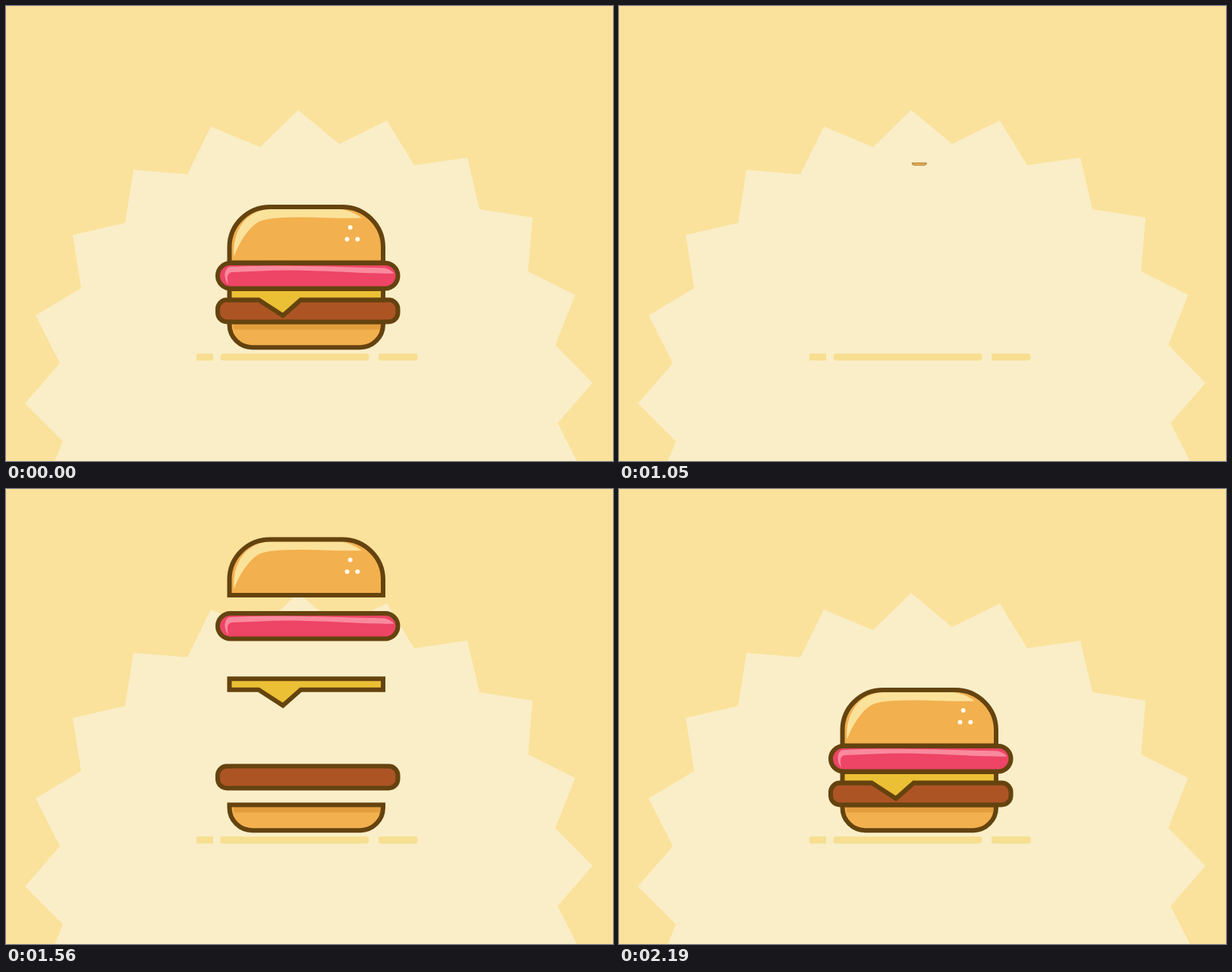
Animation of 800 by 600 pixels, one loop 2220 ms. Source, as an HTML page with a canvas:

```html
<!DOCTYPE html>
<html lang="en">
<head>
<meta charset="utf-8">
<title>Burger loop</title>
<style>
  html, body { margin: 0; width: 100%; height: 100%; overflow: hidden; background: #fae29c; }
  canvas { display: block; }
</style>
</head>
<body>
<canvas id="stage" width="800" height="600"></canvas>
<script>
const ctx = document.getElementById('stage').getContext('2d');
const LOOP = 2220, STEP = 30, STAGGER = 60;
const INK = '#64430f', BUN = '#f3b04e', DASH = '#efd277', CENTER = [400, 348];

const star = new Path2D('M385 137L439 182 502 151 538 210 608 200 624 268 694 279 688 350 750 381 ' +
  '724 447 773 497 727 550 753 601H64L75 574 25 524 71 471 39 408 99 372 88 302 157 286 168 216 ' +
  '239 222 270 159 335 186Z');

// Parts from bottom to top, drawn in their resting place; cy is the pivot.
const parts = [
  { cy: 433.5, fill: BUN,
    shape: new Path2D('M294.5 416.5H497V420C497 437 483 450.2 467 450.2H324.5C308 450.2 294.5 437 294.5 420Z'),
    detail() { box(300, 418, 194.5, 8.5, 0, '#e29e3c'); } },
  { cy: 402, fill: '#ad5424', shape: pill(279, 387.5, 237.5, 29, 12) },
  { cy: 391, fill: '#ecc035',
    shape: new Path2D('M294.5 373H497V387.5H388.5L365 408.3 333 387.5H294.5Z') },
  { cy: 355.75, fill: '#ee4466', shape: pill(279, 339, 237.5, 33.5, 16.7),
    detail() {
      paint('#f98a9e', new Path2D('M293 367C287 361 286 345 296 344C350 341 440 344 499 345.5' +
        'Q506 347 511.5 352.5C470 354 400 346 335 349.5L298 351C291 352 291 358 293 367Z'));
    } },
  { cy: 301.75, fill: BUN,
    shape: new Path2D('M294.5 338.5V318C294.5 288 319 265 348 265H443C473 265 497 289 497 318V338.5Z'),
    detail() {
      paint('#fbe29b', new Path2D('M300.5 330C298 297 316 268 350 268H441Q456 270 469 279.5' +
        'C438 281 400 277 365 279C345 280 335 282 328 288C315 299 307 314 300.5 330Z'));
      for (const [x, y] of [[453.7, 292], [449.5, 307.6], [463.3, 307.6]]) {
        const dot = new Path2D();
        dot.arc(x, y, 3, 0, 7);
        paint('#fffaeb', dot);
      }
    } }
];

// Fall of the lowest part: time, offset from rest.
const fall = [[1000, -225], [1050, -225], [1170, -222], [1230, -218], [1290, -208], [1320, -198.5],
  [1350, -189], [1380, -175], [1410, -154], [1440, -122.7], [1470, -77], [1500, -22], [1520, 0]];

function pill(x, y, w, h, r) {
  const p = new Path2D();
  p.roundRect(x, y, w, h, r);
  return p;
}

function paint(color, path) {
  ctx.fillStyle = color;
  ctx.fill(path);
}

function box(x, y, w, h, r, color) {
  paint(color, pill(x, y, w, h, r));
}

function ramp(t, from, to) {
  return Math.min(1, Math.max(0, (t - from) / (to - from)));
}

function smooth(u) {
  return u * u * (3 - 2 * u);
}

function drop(t) {
  if (t <= fall[0][0]) return fall[0][1];
  for (let i = 1; i < fall.length; i++) {
    const [t1, y1] = fall[i], [t0, y0] = fall[i - 1];
    if (t <= t1) return y0 + (y1 - y0) * ramp(t, t0, t1);
  }
  return 0;
}

function scaled(x, y, s, dy, draw) {
  if (s <= 0) return;
  ctx.save();
  ctx.translate(x, y + dy);
  ctx.scale(s, s);
  ctx.translate(-x, -y);
  draw();
  ctx.restore();
}

function drawPart(part) {
  paint(part.fill, part.shape);
  if (part.detail) part.detail();
  ctx.strokeStyle = INK;
  ctx.lineWidth = 6;
  ctx.stroke(part.shape);
}

function line(x1, y1, x2, y2, w) {
  ctx.beginPath();
  ctx.moveTo(x1, y1);
  ctx.lineTo(x2, y2);
  ctx.lineWidth = w;
  ctx.lineCap = 'round';
  ctx.strokeStyle = DASH;
  ctx.stroke();
  ctx.lineCap = 'butt';
}

function backdrop() {
  ctx.fillStyle = '#fae29c';
  ctx.fillRect(0, 0, 800, 600);
  paint('#faeec8', star);
  box(251, 458.3, 22, 9.2, 0.5, '#f7de91');
  box(282.5, 458.3, 196, 9.2, 4, '#f7de91');
  box(491, 458.3, 51.3, 9.2, 2, '#f7de91');
}

function spinner(t) {
  const size = smooth(ramp(t, 420, 500)) * (1 - smooth(ramp(t, 850, 1010)));
  if (size <= 0) return;
  ctx.save();
  ctx.translate(...CENTER);
  ctx.rotate(Math.PI * (t - 510) / 280);
  ctx.scale(size, size);
  line(12.6, -68, 13.3, -14.5, 11.5);
  ctx.restore();
}

function impact(t) {
  const out = 1 - Math.pow(1 - ramp(t, 1740, 1920), 2);
  const tail = smooth(ramp(t, 1830, 2190));
  if (t <= 1740 || t >= 2190) return;
  for (const side of [-1, 1]) {
    for (const k of [-1, 0, 1]) {
      const a = k * 0.35, reach = k ? 179 : 196;
      const tip = 140 + (reach - 140) * out;
      const root = 130 + (tip - 130) * tail;
      const dx = side * Math.cos(a), dy = Math.sin(a);
      line(CENTER[0] + dx * root, CENTER[1] + dy * root,
        CENTER[0] + dx * tip, CENTER[1] + dy * tip, 11.5 * (1 - 0.5 * tail));
    }
  }
}

function render(t) {
  backdrop();
  if (t < 990) {
    spinner(t);
    const u = ramp(t, 210, 450);
    scaled(397.5, 357.5, 1 - smooth(u), 0, () => parts.forEach(drawPart));
    return;
  }
  impact(t);
  parts.forEach((part, i) => {
    const local = t - i * STAGGER;
    scaled(395.75, part.cy, smooth(ramp(local, 995, 1285)), drop(local), () => drawPart(part));
  });
}

const start = performance.now();
function tick() {
  const t = (performance.now() - start) % LOOP;
  render(Math.floor(t / STEP) * STEP);
  requestAnimationFrame(tick);
}
tick();
</script>
</body>
</html>
```
